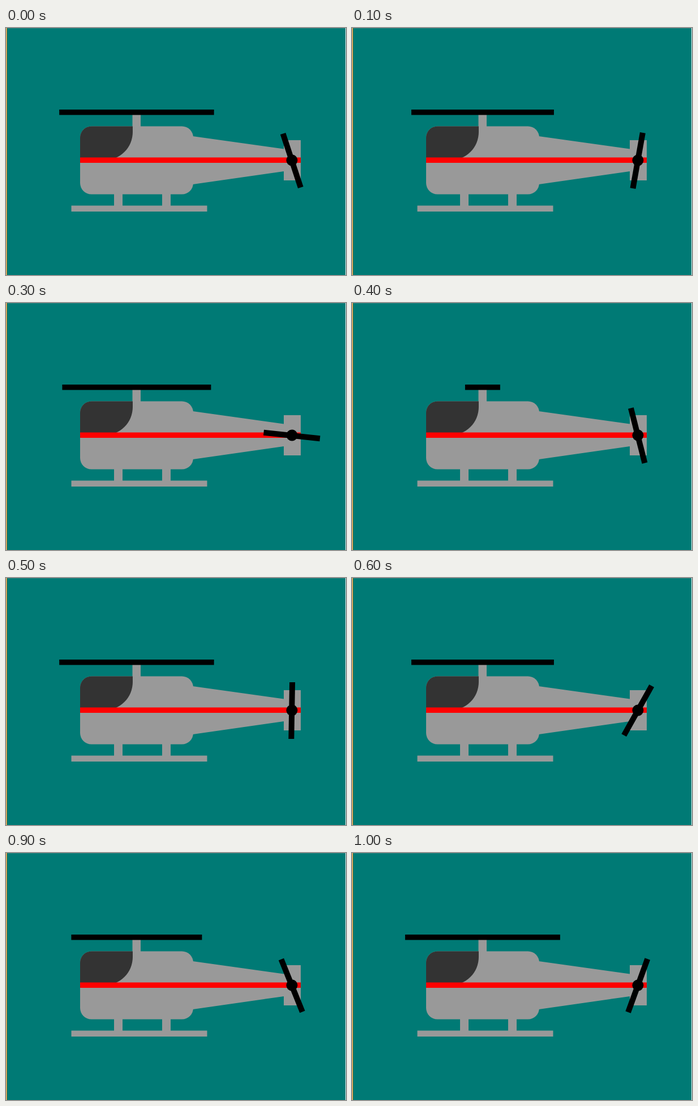
Animation, 601 px wide and 436 px high, one loop 1100 ms. Source, as an HTML page:

```html
<!DOCTYPE html>
<html lang="en">
<head>
<meta charset="utf-8">
<title>Helicopter</title>
<style>
  html, body { margin: 0; width: 100%; height: 100%; overflow: hidden; background: #007a75; }
  svg { display: block; width: 601px; height: 436px; }
</style>
</head>
<body>
<svg viewBox="0 0 601 436">
  <rect width="601" height="436" fill="#007a75"/>
  <rect width="601" height="1" fill="#2f7f7c"/>
  <rect width="1" height="436" fill="#f3d29a"/>
  <rect x="1" width="1" height="436" fill="#a8741c"/>
  <rect x="600" width="1" height="436" fill="#e4efee"/>

  <g fill="#999">
    <rect x="223.5" y="152" width="14.5" height="24"/>
    <rect x="131" y="173.5" width="200" height="120" rx="20"/>
    <path d="M330 191 L491 213.5 V253 L330 276 Z"/>
    <rect x="491" y="198" width="30" height="71"/>
    <rect x="191" y="292" width="15" height="23"/>
    <rect x="276" y="292" width="15" height="23"/>
    <rect x="115.5" y="313.5" width="240" height="10.5"/>
  </g>
  <path fill="#333" d="M131 233.5 V193.5 A20 20 0 0 1 151 173.5 H224 V183.5 A50 50 0 0 1 174 233.5 Z"/>
  <rect x="131" y="228.5" width="390" height="9.5" fill="#f00"/>

  <rect id="rotor" y="144" height="9.5"/>
  <rect id="blade" x="500.2" y="184" width="10" height="100"/>
  <circle cx="505.4" cy="233.5" r="10"/>
</svg>
<script>
  const STEP = 100;
  // [main rotor width, tail blade angle]
  const poses = [
    [273.5, -18.2], [252, 10], [231, 38.5], [263, 96],
    [62, 165.8], [273.5, 181], [252, 209.3], [220, 252.6],
    [263, 296], [231, 338], [274, 380]
  ];
  const rotor = document.getElementById('rotor');
  const blade = document.getElementById('blade');
  const start = performance.now();

  function draw(now) {
    const step = Math.floor(Math.max(0, now - start) / STEP) % poses.length;
    const [width, angle] = poses[step];
    rotor.setAttribute('x', 230.9 - width / 2);
    rotor.setAttribute('width', width);
    blade.setAttribute('transform', `rotate(${angle} 505.2 234)`);
    requestAnimationFrame(draw);
  }
  draw(start);
</script>
</body>
</html>
```
